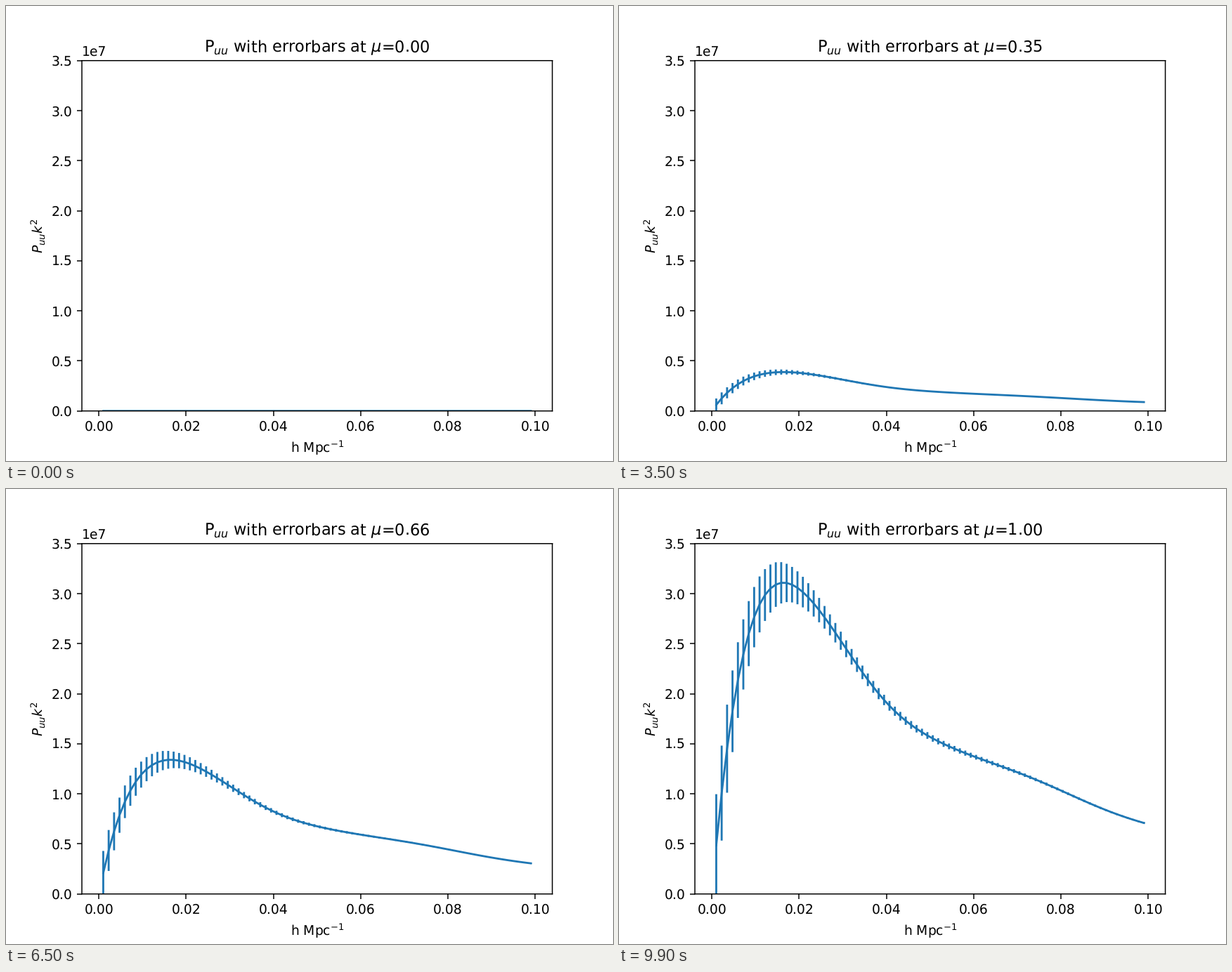
Animation, 864 px wide and 648 px high, one loop 10 s. Source, as a matplotlib script:

```python
import numpy as np
import matplotlib.pyplot as plt
from matplotlib.animation import FuncAnimation

N_FRAMES = 100
N_BINS = 80

# Keep sub-pixel positions for lines and glyph outlines
plt.rcParams.update({"path.snap": False, "text.hinting": "none"})


def velocity_power(k):
    """k^2 P_uu at mu = 1: exponential fall, a softer tail and acoustic wiggles."""
    q = 100 * k
    z = (q - 4.25) / 0.43
    tail = 0.1355 * np.logaddexp(0, z)
    wiggle = 0.0022 * q * np.sin(1.53 * (q - 6.4)) / (1 + np.exp(-z))
    return 1e7 * q * np.exp(1.64 - 0.61 * q + tail + wiggle)


k = np.linspace(0.001, 0.099, N_BINS)
power = velocity_power(k)
sigma = power * 0.001055 / k  # mode counting: relative error falls as 1/k
mus = np.linspace(0, 1, N_FRAMES)

fig, ax = plt.subplots(figsize=(6.4, 4.8), dpi=135)
line, _, (bars,) = ax.errorbar(k, 0 * power, yerr=0 * sigma)
ax.set_xlim(ax.get_xlim())
ax.set_ylim(0, 3.5e7)
ax.set_xlabel("h Mpc$^{-1}$")
ax.set_ylabel("$P_{uu}k^2$")
title = ax.set_title("")


def update(frame):
    mu = mus[frame]
    p, err = mu**2 * power, mu**2 * sigma
    line.set_ydata(p)
    bars.set_segments([[(x, y - e), (x, y + e)] for x, y, e in zip(k, p, err)])
    title.set_text(rf"P$_{{uu}}$ with errorbars at $\mu$={mu:.2f}")
    return line, bars, title


anim = FuncAnimation(fig, update, frames=N_FRAMES, interval=100,
                     repeat=True, repeat_delay=0)
plt.show()
```
